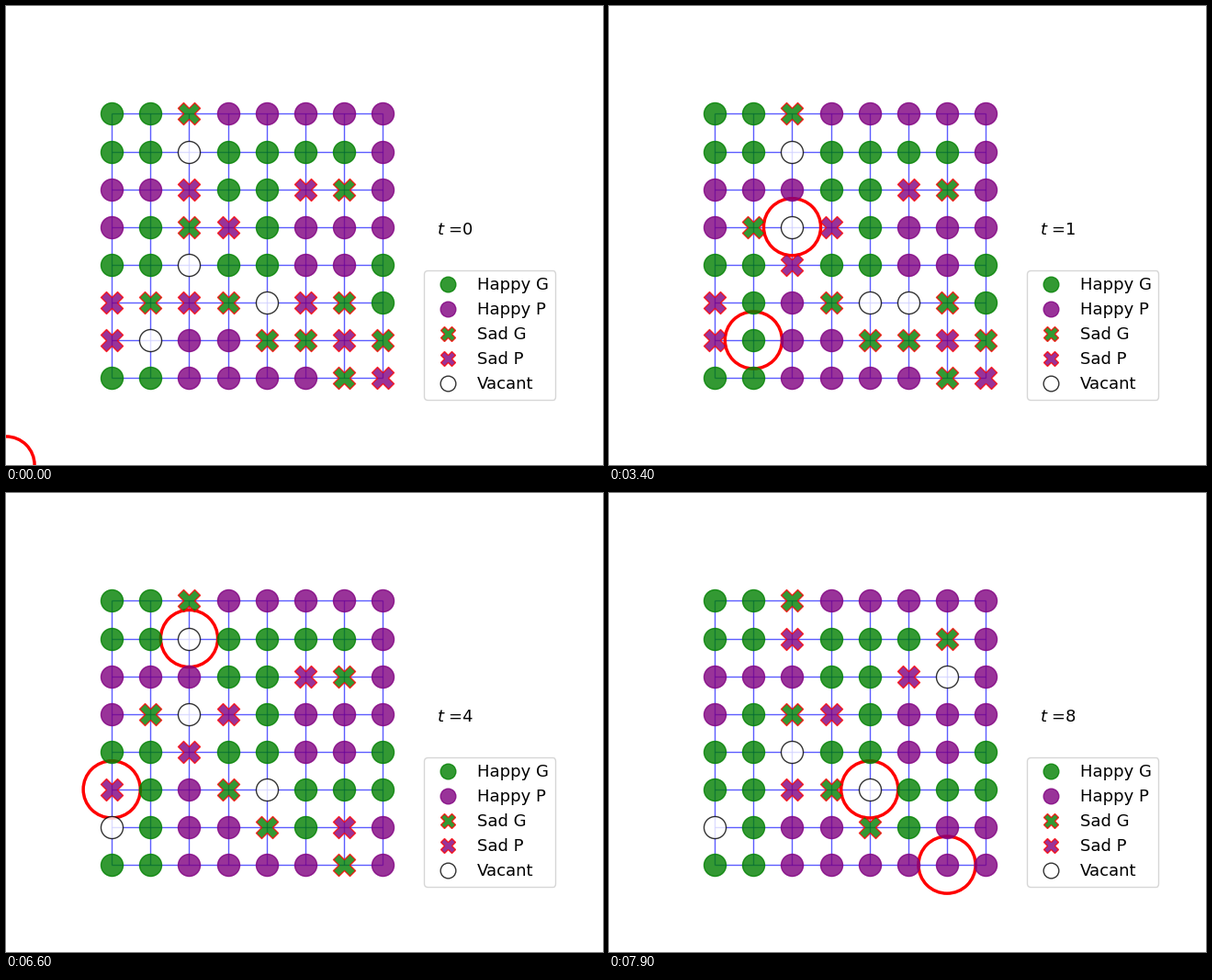
Animation, 650 px wide and 500 px high, one loop 8 s. Source, as a matplotlib script:

```python
import numpy as np
import matplotlib.pyplot as plt
from matplotlib.animation import FuncAnimation
from matplotlib.lines import Line2D

WIDTH, HEIGHT, DPI = 650, 500, 100
FONT_SIZE = 13
SIDE = 8
X0, Y0, DX, DY = 115.2, 117.4, 42.14, 41.1

START = """
GGGPPPPP
GG.GGGGP
PPPGGPGP
PGGPGPPP
GG.GGPPG
PGPG.PGG
P.PPGGPG
GGPPPPGP
""".split()

# (row, column) of the unhappy agent and of the vacancy it moves to
MOVES = [
    ((5, 5), (4, 2)), ((3, 2), (6, 1)), ((6, 7), (5, 5)),
    ((6, 0), (6, 7)), ((5, 0), (1, 2)), ((4, 2), (5, 4)),
    ((7, 6), (5, 0)), ((2, 6), (3, 2)), ((5, 4), (7, 6)),
]

# Each move has three scenes: at rest, pair ringed, moved. Lengths in 100 ms.
HOLDS = [8] * 3 + [5] * 6 + [3] * 4 + [1] * 14

KINDS = {
    "Happy G": dict(marker="o", face="green", edge="green"),
    "Happy P": dict(marker="o", face="purple", edge="purple"),
    "Sad G": dict(marker="X", face="green", edge="red"),
    "Sad P": dict(marker="X", face="purple", edge="red"),
    "Vacant": dict(marker="o", face="white", edge="black"),
}


def place(cells):
    cells = np.array(cells, float).reshape(-1, 2)
    return np.column_stack([X0 + DX * cells[:, 1], Y0 + DY * cells[:, 0]])


def kind_of(grid, row, col):
    agent = grid[row, col]
    if agent == ".":
        return "Vacant"
    around = [grid[(row + dr) % SIDE, (col + dc) % SIDE]
              for dr, dc in ((1, 0), (-1, 0), (0, 1), (0, -1))]
    others = [n for n in around if n != "."]
    happy = 2 * others.count(agent) >= len(others)
    return f"{'Happy' if happy else 'Sad'} {agent}"


def sort_cells(grid):
    groups = {name: [] for name in KINDS}
    for row, col in np.ndindex(grid.shape):
        groups[kind_of(grid, row, col)].append((row, col))
    return {name: place(cells) for name, cells in groups.items()}


def build_scenes():
    scenes = []
    grid = np.array([list(line) for line in START])
    for step, (origin, goal) in enumerate(MOVES):
        before = sort_cells(grid)
        grid[goal], grid[origin] = grid[origin], "."
        after = sort_cells(grid)
        rings = place([origin, goal])
        scenes += [(step, before, place([])), (step, before, rings),
                   (step, after, rings)]
    return scenes


scenes = build_scenes()
timeline = np.repeat(np.arange(len(scenes)), HOLDS)

fig = plt.figure(figsize=(WIDTH / DPI, HEIGHT / DPI), dpi=DPI, facecolor="white")
ax = fig.add_axes([0, 0, 1, 1])
ax.set(xlim=(0, WIDTH), ylim=(HEIGHT, 0))
ax.axis("off")

right, bottom = X0 + DX * (SIDE - 1), Y0 + DY * (SIDE - 1)
wire = dict(colors="blue", alpha=0.64, linewidth=1, zorder=1)
ax.vlines(X0 + DX * np.arange(SIDE), Y0, bottom, **wire)
ax.hlines(Y0 + DY * np.arange(SIDE), X0, right, **wire)

rings = ax.scatter([], [], s=2000, facecolors="none", edgecolors="red",
                   linewidths=2.5, zorder=2)
nodes = {
    name: ax.scatter([], [], s=300, marker=k["marker"], facecolors=k["face"],
                     edgecolors=k["edge"], linewidths=1, alpha=0.8, zorder=3)
    for name, k in KINDS.items()
}
clock = ax.text(469.3, 248.9, "", fontsize=FONT_SIZE)

handles = [
    Line2D([], [], linestyle="none", marker=k["marker"], markersize=12,
           markerfacecolor=k["face"], markeredgecolor=k["edge"], alpha=0.8,
           label=name)
    for name, k in KINDS.items()
]
ax.legend(handles=handles, loc="lower left", bbox_to_anchor=(455.3, 428.7),
          bbox_transform=ax.transData, borderaxespad=0, fontsize=FONT_SIZE)


def draw(frame):
    step, groups, ringed = scenes[timeline[frame]]
    for name, points in groups.items():
        nodes[name].set_offsets(points)
    rings.set_offsets(ringed)
    clock.set_text(f"$t$ ={step}")
    return [rings, clock, *nodes.values()]


anim = FuncAnimation(fig, draw, frames=len(timeline), interval=100,
                     repeat=True, repeat_delay=0, blit=False)
plt.show()
```
